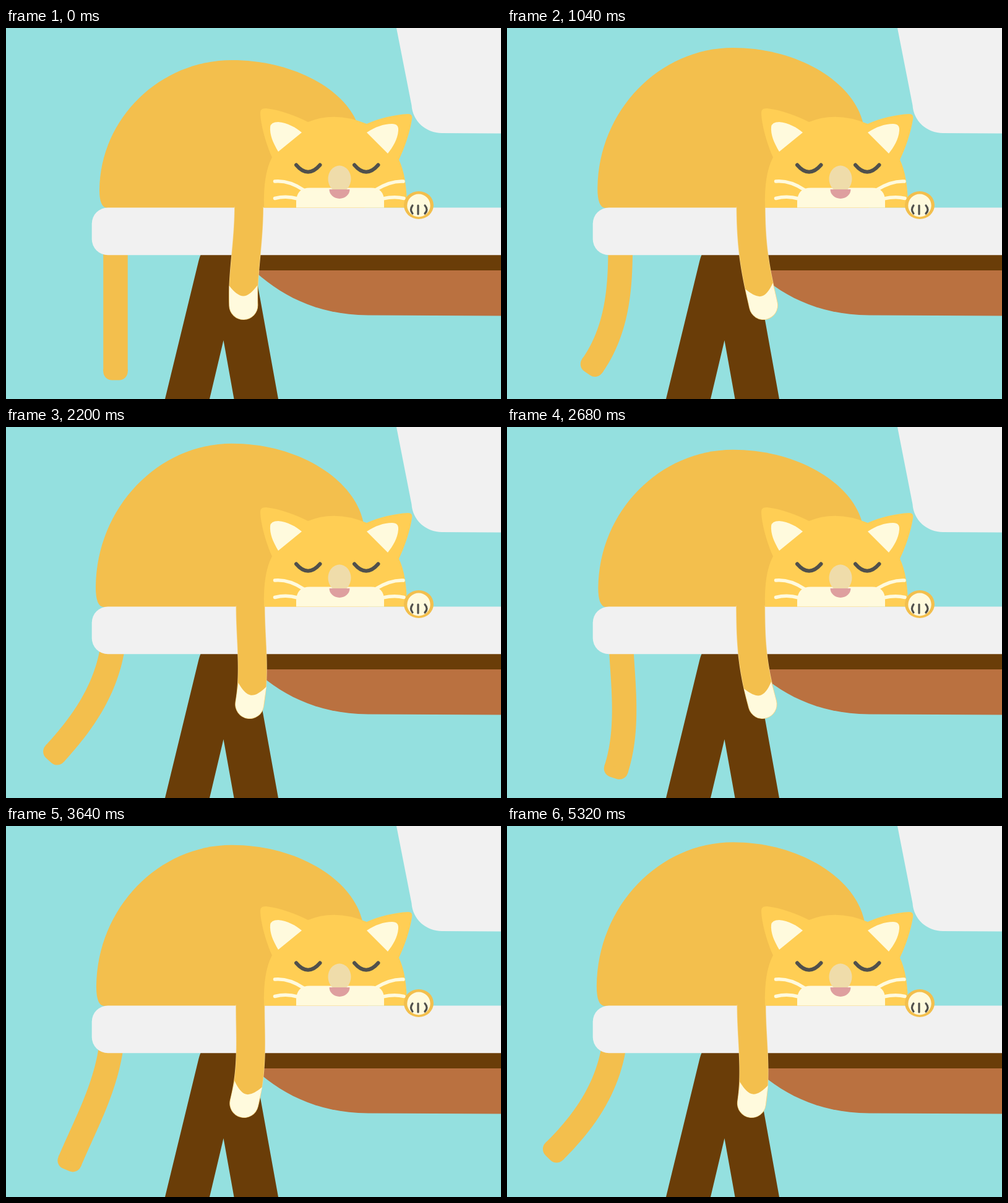
Animation of 800 by 600 pixels, one loop 5.36 s. Source, as an HTML page with a canvas:

```html
<!DOCTYPE html>
<html lang="en">
<head>
<meta charset="utf-8">
<title>Sleeping cat</title>
<style>
html, body { margin: 0; width: 100%; height: 100%; overflow: hidden; background: #94e0df; }
canvas { display: block; }
</style>
</head>
<body>
<canvas id="stage" width="800" height="600"></canvas>
<script>
const ctx = document.getElementById('stage').getContext('2d');
const LOOP = 5360, STEP = 40, BREATH = 1550, TAU = Math.PI * 2;
const FUR = '#f3bf4d', FACE = '#ffce54', CREAM = '#fffadd', DARK = '#50504c',
      PALE = '#f1f1f1', WOOD = '#6a3d08', RUST = '#ba7140';

function fill(color, d) {
  ctx.fillStyle = color;
  ctx.fill(new Path2D(d));
}

function line(color, width, d, cap = 'round') {
  ctx.strokeStyle = color;
  ctx.lineWidth = width;
  ctx.lineCap = cap;
  ctx.lineJoin = 'round';
  ctx.stroke(d instanceof Path2D ? d : new Path2D(d));
}

function ellipse(color, x, y, rx, ry, end = TAU) {
  ctx.fillStyle = color;
  ctx.beginPath();
  ctx.ellipse(x, y, rx, ry, 0, 0, end);
  ctx.fill();
}

function at(x, y, angle, draw) {
  ctx.save();
  ctx.translate(x, y);
  ctx.rotate(angle);
  draw();
  ctx.restore();
}

const wave = (cycle, peak) => Math.cos(TAU * (cycle - peak));

// The tail rests until the wave first reaches each part of it.
const lateWave = (cycle, peak) => cycle < peak - 0.75 ? 0 : wave(cycle, peak);

function drawTail(cycle) {
  const parts = 48, step = 188 / parts, path = new Path2D();
  const bend = s => (11 + 44 * s) * Math.PI / 180 * lateWave(cycle, 0.93 + 0.1 * s);
  let x = 177 + 9 * lateWave(cycle, 0.8), y = 367, angle = bend(0);
  path.moveTo(x - 30 * Math.sin(angle), y - 30);
  path.lineTo(x, y);
  for (let i = 1; i <= parts; i++) {
    angle = bend(i / parts);
    x += step * Math.sin(angle);
    y += step * Math.cos(angle);
    path.lineTo(x, y);
  }
  line(FUR, 39.5, path, 'butt');
  at(x, y, -angle, () => {
    ctx.fillStyle = FUR;
    ctx.beginPath();
    ctx.roundRect(-19.75, -3, 39.5, 17.5, [0, 0, 14, 14]);
    ctx.fill();
  });
}

function drawBody(cycle) {
  const p = (1 - wave(cycle, 0)) / 2;
  ctx.save();
  ctx.translate(365, 291);
  ctx.scale(1 + 0.03 * p, 1 + 0.113 * p);
  ctx.translate(-365, -291);
  fill(FUR, 'M163 291Q151 290 151 262C152 145 250 52 365 52C460 52 540 95 565 148C580 180 585 250 580 291Z');
  ctx.restore();
}

function drawArm(cycle) {
  const top = 290, length = 158.5, path = new Path2D();
  const center = s => 393.8 + (1.3 + 19.4 * s ** 1.85) * wave(cycle, 0.46 + 0.21 * s);
  for (let i = 0; i <= 30; i++) path.lineTo(center(i / 30), top + length * i / 30);
  const x = center(1), y = top + length;
  const angle = Math.atan2(center(0.88) - x, 0.12 * length);
  ctx.save();
  ctx.beginPath();
  ctx.rect(300, top - 1, 200, 220);
  ctx.clip();
  line('#f6d488', 47, path);
  line(FUR, 45.6, path);
  at(x, y, angle, () => fill(CREAM,
    'M-22.8 -32Q-10 -15 0 -15Q10 -15 22.8 -32V0A22.8 22.8 0 0 1 -22.8 0Z'));
  ctx.restore();
}

function drawFurniture() {
  fill(RUST, 'M396 388C440 430 500 464 585 464.5L800 465.5V388Z');
  fill(WOOD, 'M315 366H800V392H402.5L440 600H368.5L351.5 505L329 600H257L311 378Q313 370 315 366Z');
}

function drawDesk() {
  ctx.fillStyle = PALE;
  ctx.beginPath();
  ctx.roundRect(138.7, 290.5, 720, 76.8, 26);
  ctx.fill();
}

function drawHead() {
  fill(FACE, 'M417 290.5C416 255 420 228 430 209C421 190 411 155 411 137Q411 129 421 130' +
    'C445 133 468 142 488 152Q532 134 583 155C603 146 628 140 650 139Q658 139 656 148' +
    'C653 168 644 195 635 213Q648 240 648 290.5Z');
  fill(CREAM, 'M440 200C431 185 426 172 427 160Q428 152 440 152C455 153 468 161 478 169Z');
  fill(CREAM, 'M617 203L583 169C597 160 610 155 624 155Q635 155 634 166C633 180 625 193 617 203Z');
  line(CREAM, 5.5, 'M434.5 248Q457 246 481 262M434.5 275.5Q453 271 471 276' +
    'M642 248Q621 247 597 262M643 275.5Q628 272 609 276');
  fill(CREAM, 'M469 290.5V280Q470 258.5 491 258.5H590Q611 258.5 611 280V290.5Z');
  line(DARK, 6, 'M469 221.5Q488 244 507.5 221.5M563 221.5Q582 244 601.5 221.5');
  ellipse('#efdcaa', 539, 244, 18.5, 21.5);
  ellipse('#de9f9f', 539, 261, 16.5, 15, Math.PI);
}

function drawPaw() {
  ellipse(FUR, 667, 286.5, 24, 22.5);
  ellipse(CREAM, 667, 287, 18.7, 18.5);
  line(DARK, 3.2, 'M657 287Q652 294 657 300M666 287V301M677 287Q683 294 677 300');
}

function draw(time) {
  const cycle = time / BREATH;
  ctx.fillStyle = '#94e0df';
  ctx.fillRect(0, 0, 800, 600);
  fill(PALE, 'M631 0L655.5 125C657 150 678 170 705 170L800 170.5V0Z');
  drawTail(cycle);
  drawFurniture();
  drawBody(cycle);
  drawDesk();
  drawArm(cycle);
  drawHead();
  drawPaw();
}

const start = performance.now();
function tick() {
  const time = (performance.now() - start) % LOOP;
  draw(Math.floor(time / STEP) * STEP);
  requestAnimationFrame(tick);
}
tick();
</script>
</body>
</html>
```
